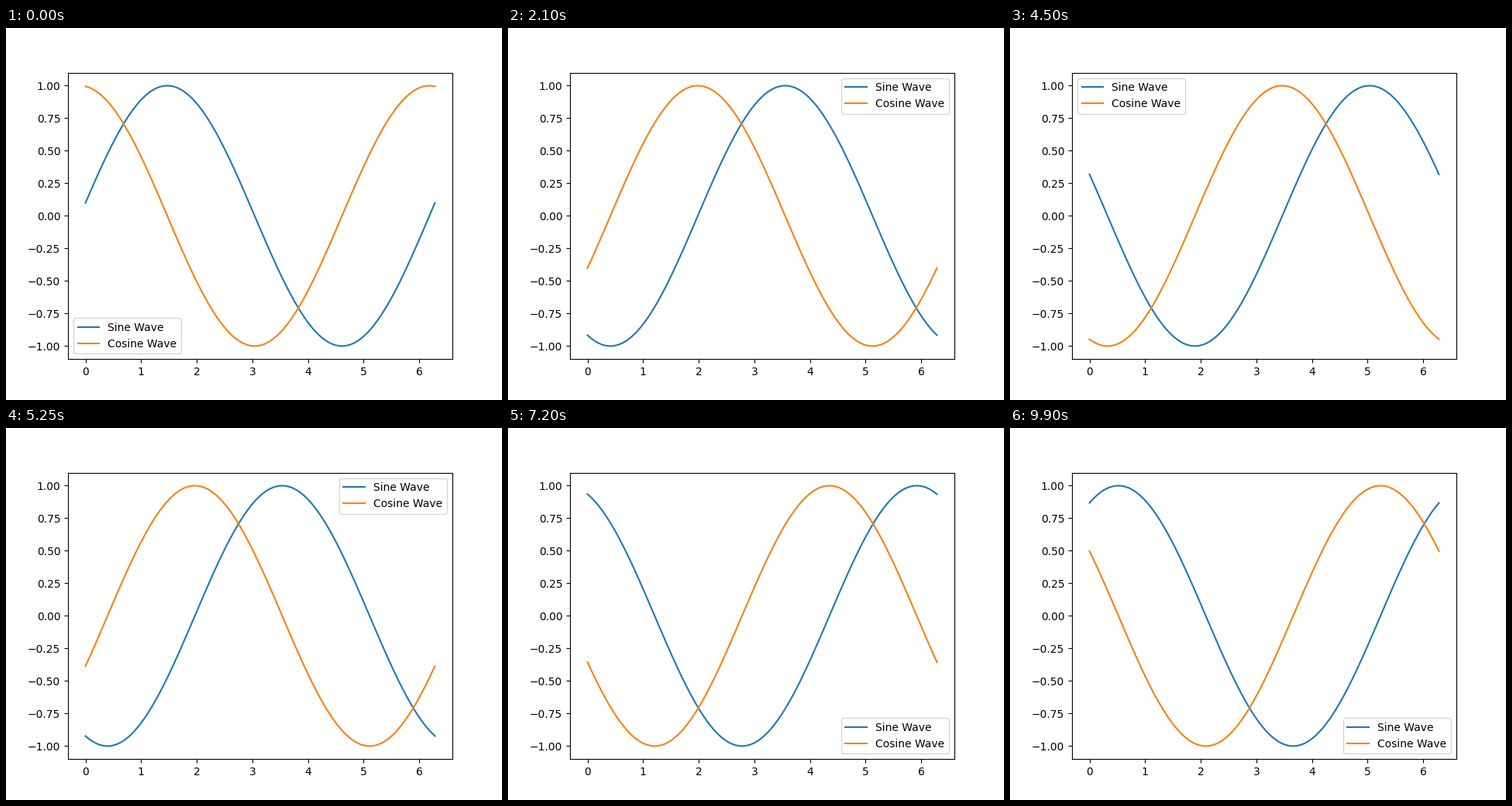
A matplotlib script for the animation above (9.95 s loop, 640 by 480 pixels).

```python
import numpy as np
import matplotlib.pyplot as plt
from matplotlib.animation import FuncAnimation

FRAMES = 199
INTERVAL = 50  # ms
PHASE_STEP = 0.1

x = np.linspace(0, 2 * np.pi, 100)

fig, ax = plt.subplots(figsize=(6.4, 4.8), dpi=100)
sine, = ax.plot(x, np.sin(x), label="Sine Wave")
cosine, = ax.plot(x, np.cos(x), label="Cosine Wave")
# "best" is worked out again on every draw, so the legend dodges the curves
ax.legend(loc="best")


def update(frame):
    phase = (frame + 1) * PHASE_STEP
    sine.set_ydata(np.sin(x + phase))
    cosine.set_ydata(np.cos(x + phase))
    return sine, cosine


anim = FuncAnimation(fig, update, frames=FRAMES, interval=INTERVAL,
                     repeat=True, repeat_delay=0, blit=False)
plt.show()
```
